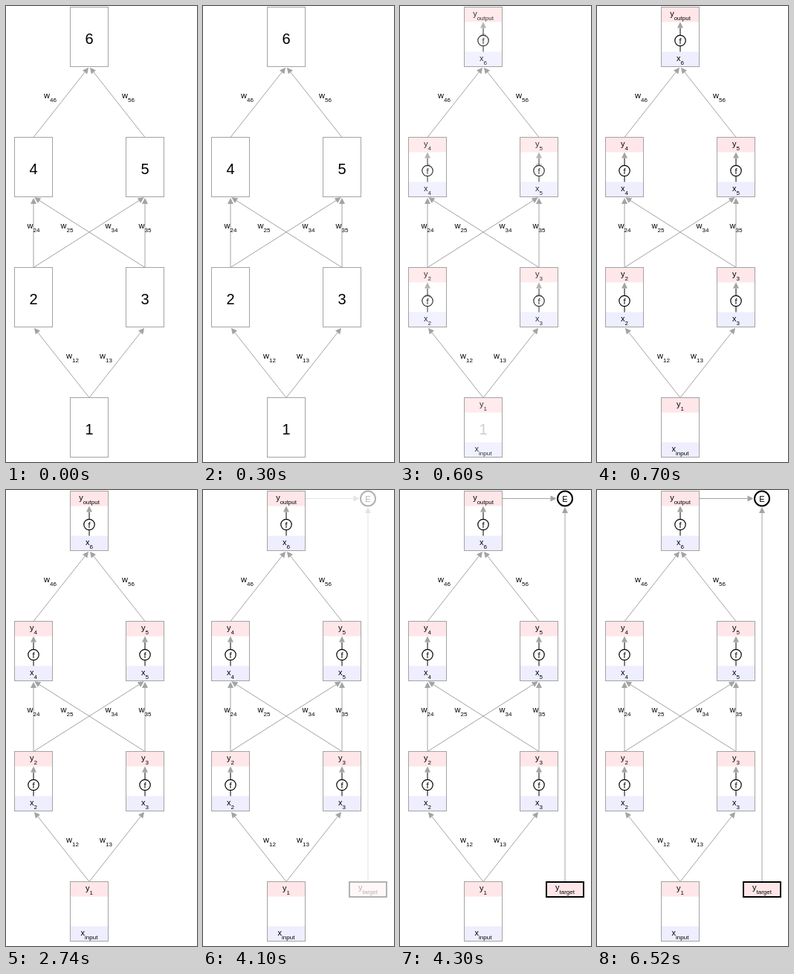
Animation, 257 px wide and 613 px high, one loop 8 s. Source, as an HTML page:

```html
<!DOCTYPE html>
<html lang="en">
<head>
<meta charset="utf-8">
<title>Neural network build-up</title>
<style>
html, body { margin: 0; width: 100%; height: 100%; overflow: hidden; background: #fff; }
svg { display: block; width: 257px; height: 613px; }
text { font: 11px "Liberation Sans", Arial, sans-serif; fill: #000; text-anchor: middle; }
.digit { font-size: 20px; }
.index { font-size: 8px; }
</style>
</head>
<body>
<svg viewBox="0 0 257 613" xmlns="http://www.w3.org/2000/svg"></svg>
<script>
const LOOP = 8000, STEP = 100, FADE = 190;
const GREY = '#a3a3a3', PINK = '#ffe6e8', BLUE = '#eeeeff';
const W = 51, H = 80, BAND = 20;   // node box and its coloured bands
const LAST = 6;

function add(parent, tag, attrs = {}, content = '') {
  const el = document.createElementNS('http://www.w3.org/2000/svg', tag);
  for (const k in attrs) el.setAttribute(k, attrs[k]);
  el.textContent = content;
  parent.appendChild(el);
  return el;
}

const svg = document.querySelector('svg');
const [fills, base, digits, inner, goal] = Array.from({ length: 5 }, () => add(svg, 'g'));

function rect(parent, x, y, w, h, fill, stroke = 'none', width = 1) {
  add(parent, 'rect', { x, y, width: w, height: h, fill, stroke, 'stroke-width': width });
}

// Letter with a smaller lowered index
function label(parent, x, y, letter, index) {
  const t = add(parent, 'text', { x, y });
  add(t, 'tspan', {}, letter);
  add(t, 'tspan', { dy: 5, class: 'index' }, index);
}

function arrow(parent, x1, y1, x2, y2, gap = 1.5, stroke = GREY) {
  const d = Math.hypot(x2 - x1, y2 - y1);
  const ux = (x2 - x1) / d, uy = (y2 - y1) / d;
  const tx = x2 - ux * gap, ty = y2 - uy * gap;
  const bx = tx - ux * 8, by = ty - uy * 8;
  add(parent, 'path', { d: `M${x1} ${y1}L${bx} ${by}`, stroke });
  add(parent, 'path', {
    d: `M${tx} ${ty}L${bx - uy * 4} ${by + ux * 4}L${bx + uy * 4} ${by - ux * 4}Z`,
    fill: GREY
  });
}

function ring(parent, cx, cy, r, width, letter) {
  add(parent, 'circle', { cx, cy, r, fill: '#fff', stroke: '#000', 'stroke-width': width });
  add(parent, 'text', { x: cx, y: cy + 4 }, letter);
}

// Rows run upwards: 1 | 2 3 | 4 5 | 6
const nodes = Array.from({ length: LAST }, (_, i) => {
  const id = i + 1, row = id >> 1;
  const side = id === 1 || id === LAST ? 0 : id % 2 ? 1 : -1;
  return { id, row, x: 112 + 75 * side, y: 526.5 - 175 * row };
});

function drawNode({ id, x, y }) {
  const left = x - W / 2;
  rect(fills, left, y, W, BAND, PINK);
  rect(fills, left, y + H - BAND, W, BAND, BLUE);
  rect(base, left, y, W, H, 'none', GREY);
  add(digits, 'text', { x, y: y + 49.5, class: 'digit' }, id);
  label(inner, x, y + 12.5, 'y', id === LAST ? 'output' : id);
  label(inner, x, y + 72.5, 'x', id === 1 ? 'input' : id);
  if (id === 1) return;
  arrow(inner, x, y + H - BAND, x, y + BAND, 0, '#000');
  ring(inner, x, y + 45, 7.2, 1.2, 'f');
}

function drawEdge(a, b) {
  arrow(base, a.x, a.y, b.x, b.y + H);
  label(base, a.x + 0.3 * (b.x - a.x), a.y - 52.5, 'w', `${a.id}${b.id}`);
}

nodes.forEach(drawNode);
for (const a of nodes)
  for (const b of nodes)
    if (b.row === a.row + 1) drawEdge(a, b);

arrow(goal, 137, 11.5, 212, 11.5);
arrow(goal, 222, 527, 222, 21.5);
ring(goal, 222, 11.5, 10, 2, 'E');
rect(goal, 197, 527, 50, 20, PINK, '#000', 2);
label(goal, 222, 538, 'y', 'target');

// Cosine ease, sampled on the animation's time steps
function fade(t, start) {
  const p = (Math.floor(t / STEP) * STEP - start) / FADE;
  return (1 - Math.cos(Math.PI * Math.min(1, Math.max(0, p)))) / 2;
}

function draw(t) {
  const shown = fade(t, 465);
  fills.setAttribute('opacity', shown);
  inner.setAttribute('opacity', shown);
  digits.setAttribute('opacity', 1 - shown);
  goal.setAttribute('opacity', fade(t, 4030));
}

const begin = performance.now();
function tick() {
  draw((performance.now() - begin) % LOOP);
  requestAnimationFrame(tick);
}
tick();
</script>
</body>
</html>
```
